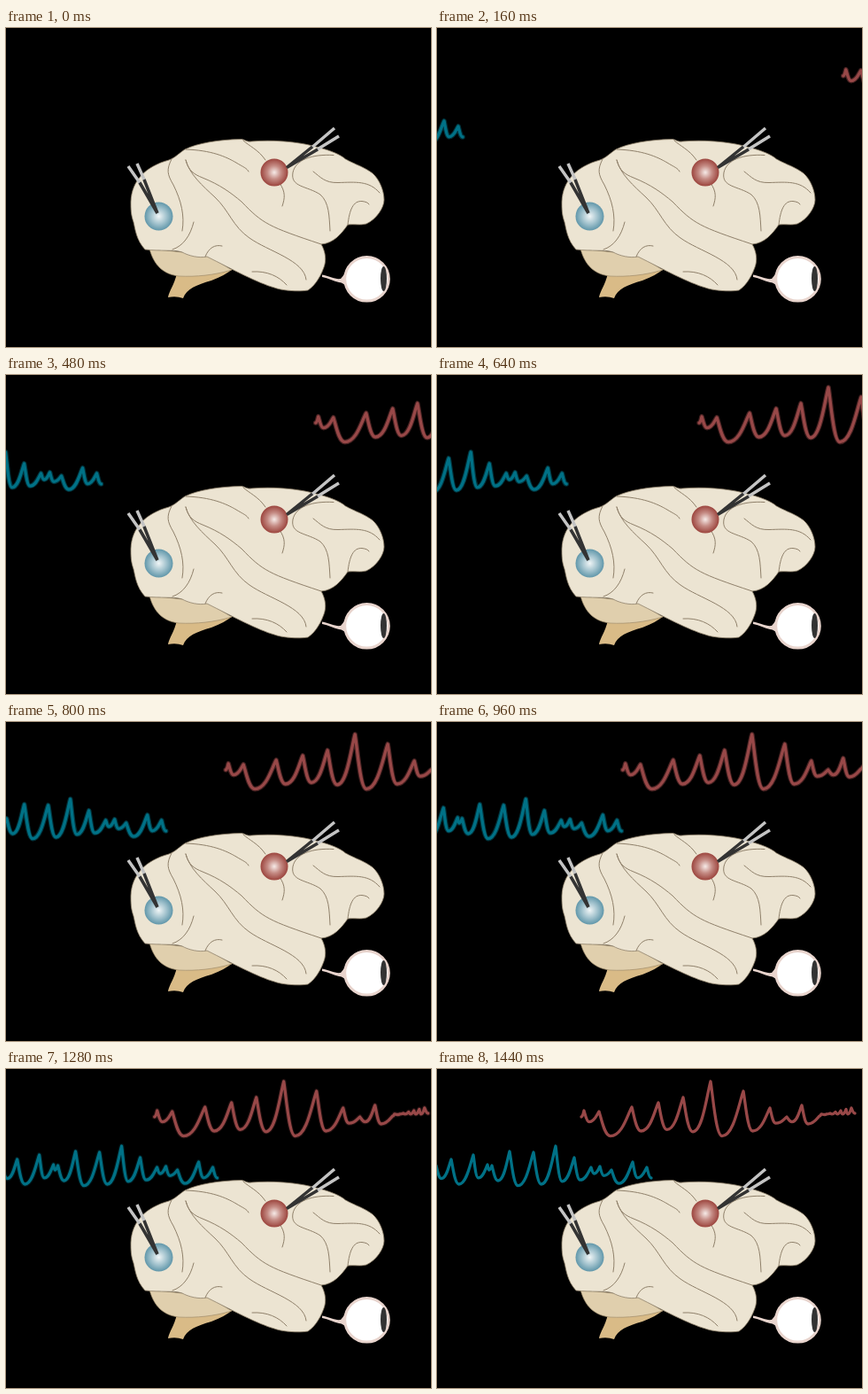
An HTML page that plays this animation: 480 px wide and 360 px high, repeating every 1.48 s.

```html
<!DOCTYPE html>
<html lang="en">
<head>
<meta charset="utf-8">
<title>Brain recordings</title>
<style>
  html, body { margin: 0; width: 100%; height: 100%; overflow: hidden; background: #000; }
  svg { display: block; width: 480px; height: 360px; }
  .folds { fill: none; stroke: #8f806a; stroke-linecap: round; }
  .wave { fill: none; stroke-linejoin: round; stroke-linecap: round; }
  .core { stroke-width: 3.3; }
  .halo { stroke-width: 5.6; }
  .metal { stroke: #c4c4c4; stroke-width: 3.5; }
  .probe { stroke: #333; stroke-width: 3.5; }
</style>
</head>
<body>
<svg viewBox="0 0 480 360">
  <defs>
    <radialGradient id="blueBall">
      <stop offset="0" stop-color="#f0f5f6"/>
      <stop offset=".5" stop-color="#a9c7d1"/>
      <stop offset="1" stop-color="#6197aa"/>
    </radialGradient>
    <radialGradient id="redBall">
      <stop offset="0" stop-color="#f6eae7"/>
      <stop offset=".5" stop-color="#c48a83"/>
      <stop offset="1" stop-color="#9c453e"/>
    </radialGradient>
  </defs>

  <!-- stem and cerebellum -->
  <path fill="#d9bb87" d="M193,277C190,290 184,297 183,304Q192,302 200,305C204,294 215,290 232,285C242,281 250,277 256,272Z"/>
  <path fill="#e0cfad" stroke="#a08d6c" stroke-width=".7" d="M162,249C167,268 178,278 195,280C215,281 235,279 255,273L227,256Z"/>

  <path fill="#ece4d2" stroke="#8f806a" stroke-width=".8" d="M157,250C147,239 146,227 144,219C141,210 141,205 141,196C142,172 158,156 184,149C190,147 196,141 202,137C216,130 240,126 266,125.5C270,126 272,129 277,128C300,126 330,128 350,134C362,137 374,141 381,146C386,151 404,156 414,164C422,171 427,184 427,194C427,203 418,216 407,221C400,223 393,221 386,222C379,232 370,243 356,244C361,253 362,262 359,270C354,284 347,292 341,296C330,298 310,296 303,293C285,288 255,272 227,258C218,260 206,257 199,253C190,250 175,252 157,250Z"/>

  <g class="folds">
    <path d="M187,148C181,160 182,165 189,177C198,195 202,212 199,229"/>
    <path d="M212,219C208,235 200,246 188,250"/>
    <path d="M203,149C206,161 212,165 222,169C242,177 254,186 266,196C290,221 296,224 356,244"/>
    <path d="M203,149C207,165 222,178 236,191C252,206 256,224 275,237C296,252 337,262 339,284"/>
    <path d="M203,137C232,138 248,145 260,152C268,157 272,158 274,162"/>
    <path d="M268,127C274,133 285,137 293,149"/>
    <path d="M309,175C316,185 315,192 312,201"/>
    <path d="M370,143.500C345,142 327,149 324,163C321,180 340,178 355,188C365,197 365,212 366,229"/>
    <path d="M347,162C355,168 360,175 375,174.500C395,174 410,172 422,186"/>
    <path d="M386,222C388,205 392,195 402,195.500C406,196 409,197 410,199"/>
    <path d="M225,258C229,248 236,244 244,246"/>
    <path d="M278,275C295,274 308,280 317,290"/>
  </g>

  <circle cx="172.500" cy="212.500" r="16" fill="url(#blueBall)"/>
  <path class="metal" d="M138,156L152,176M148,153L157,173"/>
  <path class="probe" d="M151,174.500L171,209M156,171L171,209"/>

  <circle cx="303" cy="163" r="15.500" fill="url(#redBall)"/>
  <path class="metal" d="M371,113L344,136M376,122L350,138"/>
  <path class="probe" d="M346,134L317,157.500M352,137L317,157.500"/>

  <!-- eye -->
  <path fill="#e8d4cd" d="M357,278.500C365,280 372,284 378,283C381,280 383,276 384,274L386,294C383,290 380,287 376,287C370,286 364,282 357,281Z"/>
  <circle cx="407.500" cy="283.300" r="24.800" fill="#fff" stroke="#e8d4cd" stroke-width="3"/>
  <ellipse cx="426.500" cy="283" rx="3.500" ry="14" fill="#333"/>

  <g id="teal" class="wave" stroke="#007186"></g>
  <g id="red" class="wave" stroke="#984848"></g>
</svg>
<script>
const LOOP = 1480, TRAVEL = 1440, STEP = 40;

// A trace is set by its peaks; the wider the gap between two, the deeper the trough.
function tracePath(start, peaks, end, base) {
  const turns = [start];
  peaks.forEach(([x, y], i) => {
    turns.push([x, y]);
    if (i === peaks.length - 1) return;
    const gap = peaks[i + 1][0] - x;
    turns.push([x + gap * .35, base + gap * .8]);
  });
  turns.push(end);

  // Rounded troughs, pointed peaks.
  return turns.slice(1).reduce((d, [x1, y1], i) => {
    const [x0, y0] = turns[i], dx = x1 - x0, dy = y1 - y0;
    const ctrl = dy < 0
      ? [x0 + dx * .55, y0, x1 - dx * .2, y1 - dy * .25]
      : [x0 + dx * .2, y0 + dy * .25, x1 - dx * .55, y1];
    return `${d}C${ctrl} ${x1},${y1}`;
  }, `M${start}`);
}

const tealPeaks = [[-1, 109], [16, 102], [41, 97], [57, 108], [62, 109], [82, 93], [109, 94],
  [134, 87], [155, 100], [174, 111], [184, 110], [197, 114], [221, 105], [237, 111]];

const redPeaks = [[166, 47], [183, 48], [220, 43], [250, 38], [278, 32], [309, 14],
  [346, 25], [376, 44], [395, 54], [412, 41]];
for (let x = 432; x < 472; x += 6) redPeaks.push([x, 53 - (x - 432) / 4]);

function addWave(id, path) {
  const group = document.getElementById(id);
  group.innerHTML = ['halo', 'core'].map(c => `<path class="${c}" d="${path}"/>`).join('');
  return { group, halo: group.firstChild };
}

const waves = [
  { ...addWave('teal', tracePath([-6, 118], tealPeaks, [242, 123], 110)), dir: -.72 },
  { ...addWave('red', tracePath([163, 54], redPeaks, [472, 50], 46)), dir: 1 },
];

const bezier = (s, a, b) => 3 * (1 - s) ** 2 * s * a + 3 * (1 - s) * s * s * b + s ** 3;

function ease(u) {
  if (u <= 0) return 0;
  if (u >= 1) return 1;
  let lo = 0, hi = 1;
  for (let i = 0; i < 30; i++) {
    const mid = (lo + hi) / 2;
    if (bezier(mid, .4, .6) < u) lo = mid; else hi = mid;
  }
  return bezier(lo, .5, 1);
}

const remaining = t => 346 * (1 - ease(t / TRAVEL));

function draw(now) {
  const t = Math.floor((now % LOOP) / STEP) * STEP;
  const gap = remaining(t);
  const speed = gap - remaining(t + STEP);
  for (const { group, halo, dir } of waves) {
    group.setAttribute('transform', `translate(${gap * dir})`);
    halo.setAttribute('opacity', Math.min(.45, speed * .1));
  }
}

const start = performance.now();
function tick() {
  draw(performance.now() - start);
  requestAnimationFrame(tick);
}
tick();
</script>
</body>
</html>
```
